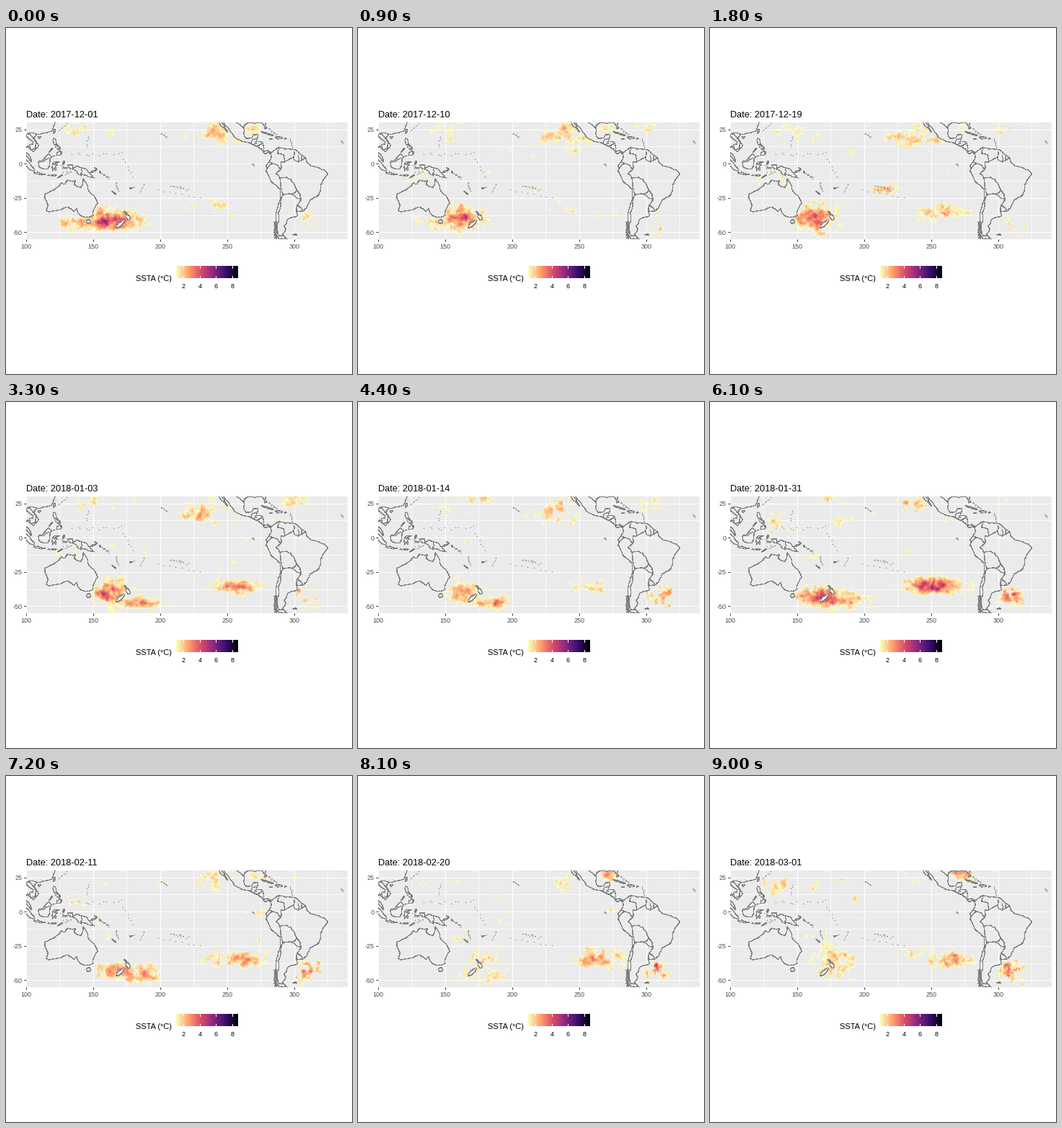
Write a matplotlib script that moves like this. It is 480 by 480 pixels and loops after 9100 ms.

```python
import numpy as np
import matplotlib.pyplot as plt
from matplotlib.animation import FuncAnimation
from matplotlib.collections import LineCollection
from matplotlib.colors import LinearSegmentedColormap
from matplotlib.path import Path

W = H = 480
DPI = 100
PX = 72 / DPI
DAYS = 91
START = np.datetime64("2017-12-01")
GREY = "#7F7F7F"
V_MIN, V_MAX = 1.07, 8.72
HEAT = LinearSegmentedColormap.from_list("heat", plt.cm.magma_r(np.linspace(0, 1, 6)))
rng = np.random.default_rng(12)

plt.rcParams["font.family"] = "Liberation Sans"
plt.rcParams["axes.unicode_minus"] = False

lines, lands, dots = [], [], []


def rough(p):
    """Subdivide a polyline, nudging midpoints sideways for a natural edge."""
    for _ in range(3):
        d = np.diff(p, axis=0)
        side = np.stack([-d[:, 1], d[:, 0]], 1)
        out = np.empty((2 * len(p) - 1, 2))
        out[::2] = p
        out[1::2] = p[:-1] + d / 2 + side * rng.normal(0, 0.07, (len(d), 1))
        p = out
    return p


def border(*v):
    lines.append(rough(np.reshape(np.array(v, float), (-1, 2))))


def coast(*v):
    border(*v, *v[:2])
    lands.append(Path(lines[-1]))


def isle(x, y, length, width, tilt):
    """A ragged ellipse."""
    a = np.arange(8) * np.pi / 4
    z = (length * np.cos(a) + 1j * width * np.sin(a)) / 2 * np.exp(1j * np.radians(tilt))
    coast(*np.stack([x + z.real, y + z.imag], 1).ravel())


def chain(x0, y0, x1, y1, n, spread=0.6):
    """Tiny islands scattered along a line."""
    t = np.linspace(0, 1, n)[:, None]
    line = np.array([x0, y0]) * (1 - t) + np.array([x1, y1]) * t
    dots.append(line + rng.uniform(-spread, spread, (n, 2)))


# Americas
coast(243, 32, 245, 28, 250.2, 23, 248, 27.5, 245.3, 31, 246.9, 31.2, 250.7, 26,
      254.5, 21, 256, 18.8, 263.5, 15.7, 267.5, 14.6, 274.2, 11.5, 277, 8.2,
      279.5, 7.4, 281, 8.9, 282.8, 6.5, 282.6, 3.5, 279.3, -1, 279, -5.5,
      283.7, -13.8, 289.7, -18.4, 289.3, -27, 286.4, -38, 287, -44, 285, -50,
      289, -54.8, 294.8, -54.8, 291.2, -52, 294, -47.5, 292.5, -45.5, 295, -41,
      302.5, -38, 301.6, -34.5, 306, -34.7, 312, -26.5, 318.5, -22.5, 321, -13,
      325.2, -7.5, 322.5, -4.7, 316, -2.3, 310, 0.5, 308.5, 4.5, 298, 10.5,
      288.5, 12, 283.3, 8, 280.5, 9.5, 277.5, 9, 276.8, 15, 271.8, 15.9,
      273, 21.3, 269.6, 21, 268.5, 18.7, 264, 18.5, 262.3, 22, 262.8, 27.5,
      265.5, 29.6, 270.5, 29.2, 276, 29.8, 278.5, 25.3, 279.9, 26, 278.7, 31)
fjord = np.linspace(-42, -54.8, 70)
lines.append(np.stack([286 + rng.uniform(-1, 1.2, 70), fjord], 1))
isle(280, 21.8, 10.5, 1, -18)
isle(288.7, 18.9, 5.5, 1.5, -5)
isle(282.7, 18.1, 2, 0.6, 0)
isle(293.5, 18.2, 1.5, 0.5, 0)
isle(300.5, -51.7, 3, 0.8, 0)

border(256, 30.6, 258, 29.5, 260.5, 27.5, 262.8, 26)
border(267.8, 14.6, 269, 17.8, 271.5, 18.2)
border(270, 14, 272, 14.5, 271, 15.8)
border(272.6, 13, 276.8, 15)
border(274.2, 11.1, 276.3, 10.9)
border(282.5, 8.6, 282.5, 7)
border(288.6, 11.5, 287.5, 7.5, 292.5, 6.2, 293, 1.2, 290.2, 1, 290, -4.2)
border(281.2, 1.4, 284.6, 0, 290, -4.2, 286.3, -7.5, 289.4, -11, 290.5, -18)
border(279.7, -3.8, 284.6, 0)
border(289.4, -11, 294.6, -9.8, 299.8, -14, 302, -19.5, 297.5, -22, 291.8, -22.5, 290.5, -18)
border(291.8, -22.5, 290, -31, 288.5, -40, 287.5, -48, 288, -52, 291.6, -52.2)
border(297.5, -22, 302.3, -25.2, 305.4, -26, 302.4, -30.2, 301.6, -34.3)
border(302, -19.5, 305.4, -26)
border(302.4, -30.2, 306.5, -33.5)
border(300, 8.5, 299.5, 4.5, 293, 1.2)
border(299.5, 4.5, 300.5, 2, 305.5, 2.3, 308.4, 4.2)
border(303, 6, 303.3, 2)
border(306, 5.6, 305.5, 2.3)

# Asia and its islands
coast(122, 32, 121, 28, 114, 22.3, 108.2, 21.5, 105.8, 19, 109.3, 13, 105, 8.6,
      101, 13, 99.3, 10, 103.4, 4, 104, 1.4, 100.3, 6, 97, 10, 95, 34)
border(108, 21.5, 104, 22.6, 100, 21)
border(102, 22.4, 104.5, 19.5, 107.5, 15.5, 107, 11.5, 104.6, 10.4)
border(100, 20, 102, 18, 105, 16, 105.2, 14.3, 102.6, 13.8, 102.8, 11.8)
coast(109, 1, 113, 3.2, 116.8, 7, 119, 5, 117.5, 0.5, 116, -4, 110.2, -2.8)
border(109.6, 1.8, 112, 1.2, 115.5, 3.5, 117.8, 4.1)
coast(120, 0.5, 125, 1.5, 120.5, -0.5, 123.3, -1, 121.8, -2, 122.5, -5,
      120.8, -3, 119.6, -5.5)
isle(100.7, 0, 16, 3.5, -46)
isle(110, -7.3, 9, 1.2, -8)
isle(119.5, -8.5, 7, 0.7, 0)
isle(125.3, -9.3, 4.5, 0.8, 30)
isle(128, 0.7, 2.8, 1, 80)
isle(129.4, -3.1, 3, 0.5, -5)
isle(121.3, 16, 5.2, 2.2, -75)
isle(123.2, 13.5, 2.5, 0.8, -40)
isle(124.7, 7.6, 4, 3, 30)
isle(118.4, 9.8, 4, 0.5, 48)
isle(125, 11.5, 2.2, 1, -60)
isle(121, 23.6, 3.4, 1.2, 70)
isle(109.8, 19.2, 2, 1.4, 20)

# Australasia
coast(113.7, -22.5, 115.7, -32, 115.2, -34.3, 118, -35, 123.8, -33.8, 131.2, -31.5,
      135.6, -34.8, 137.8, -32.8, 140.5, -38, 146.4, -39, 150, -37.5, 153.4, -29,
      150.8, -23.4, 146, -18.5, 145.2, -14.8, 142.6, -10.8, 141, -17.3,
      135.6, -14.9, 136.8, -12.2, 131, -12, 129, -14.9, 126, -14, 122.2, -18)
coast(131, -0.8, 134.5, -1, 135, -3.3, 138, -1.6, 145.8, -5, 147.5, -7,
      150.8, -10.4, 147, -9.8, 143.5, -8.3, 139, -8, 138, -5.4, 133, -3.8)
border(141, -2.6, 141, -9)
isle(146.6, -42.2, 3.2, 3, 0)
isle(176, -39, 5, 2.8, -65)
isle(174.2, -36, 3.4, 0.8, -48)
isle(170.2, -43.9, 8.5, 2.4, 42)
isle(150.3, -5.5, 4.5, 0.9, 25)
isle(152, -3.6, 3, 0.4, -40)
isle(155.2, -6.2, 2, 0.6, -50)
isle(165.5, -21.3, 4, 0.5, -38)
isle(178, -17.8, 1.3, 0.9, 0)

# Small island groups
chain(200.5, 22, 205, 19.3, 8, 0.3)
chain(156.6, -7, 161.8, -10.4, 16)
chain(166.6, -13.5, 169, -19.5, 10)
chain(178, -18, 180, -16.5, 5)
chain(208, -16, 220, -19, 14, 1.3)
chain(134, 7.5, 171, 7, 12, 1.3)
chain(145, 13, 146, 20, 5)
chain(172, 3, 180, -9, 6)
chain(188, -14, 185, -21, 6)
chain(198, -19, 230, -25, 8)
chain(297, 18, 299, 11, 10, 0.3)
chain(281, 26, 287, 21, 12)
chain(268.6, 0, 270, -1, 6, 0.3)
chain(335, 17, 336.5, 15, 6, 0.4)
chain(122, 12, 126, 9, 22, 1)
chain(119, 5, 122, 7, 6)
chain(126, -1, 129, -4, 8, 1)
chain(128, -7, 134, -6, 8, 1)
chain(124, 24, 130, 29, 7, 0.4)

# Anomaly field on a one degree grid
lon, lat = np.meshgrid(np.arange(120.5, 320), np.arange(-54.5, 30))
cells = np.stack([lon.ravel(), lat.ravel()], 1)
is_land = np.any([p.contains_points(cells) for p in lands], axis=0).reshape(lon.shape)

events = []


def warm(x, y, sx, sy, peak, day, span):
    """A patch of warm water that swells and fades around one day."""
    shape = np.exp(-((lon - x) / sx) ** 2 / 2 - ((lat - y) / sy) ** 2 / 2)
    events.append((peak * shape, day, span))


# South Pacific
warm(165, -41.5, 13, 4.5, 4.7, 0, 9)
warm(142, -42.5, 10, 4, 2.2, 0, 9)
warm(163, -40, 10, 6.5, 4, 21, 19)
warm(186, -47.5, 12, 3.5, 3, 36, 9)
warm(168, -43, 12, 5, 4.2, 61, 11)
warm(187, -46, 11, 4.5, 2.8, 68, 10)
warm(178, -36, 10, 10, 1.7, 92, 12)
warm(240, -31, 13, 3.5, 1, 0, 6)
warm(217, -19, 7, 2.5, 1.7, 18, 7)
warm(257, -36, 12, 4, 2.8, 27, 13)
warm(250, -35, 14, 4, 4.3, 61, 8)
warm(264, -35, 13, 5, 2.6, 82, 14)
warm(238, -30, 12, 2.5, 1.4, 90, 8)
warm(134, -12, 12, 5, 1, 22, 16)
# North Pacific
warm(242, 24, 8, 6, 2, 0, 16)
warm(230, 18, 12, 5, 1.9, 28, 22)
warm(239, 24, 9, 6, 1.7, 60, 20)
warm(254, 17, 9, 3, 1.4, 10, 18)
warm(138, 24, 9, 5, 1.1, 0, 8)
warm(150, 24, 14, 5, 1.1, 26, 18)
warm(176, 28, 12, 2.5, 1.5, 50, 12)
warm(136, 10, 8, 7, 1, 60, 14)
warm(138, 20, 13, 5, 1.3, 92, 10)
# Gulf and Atlantic
warm(272, 25, 6, 4, 1.3, 0, 18)
warm(272, 28, 6, 4, 3.2, 90, 13)
warm(302, 26, 9, 5, 1.1, 32, 24)
warm(311, -42, 8, 6, 1.7, 70, 35)
warm(307, -41, 2.5, 4, 3.8, 88, 10)
# Faint short-lived patches
for _ in range(45):
    warm(rng.uniform(122, 290), rng.uniform(-22, 29), rng.uniform(4, 10), rng.uniform(2, 4),
         rng.uniform(0.55, 0.85), rng.uniform(0, 90), rng.uniform(6, 14))

STEP = 4
ky = np.fft.fftfreq(lon.shape[0])[:, None]
kx = np.fft.fftfreq(lon.shape[1])
white = np.fft.fft2(rng.normal(size=(DAYS // STEP + 2,) + lon.shape))


def blurred(sigma):
    n = np.fft.ifft2(white * np.exp(-2 * (np.pi * sigma) ** 2 * (kx**2 + ky**2))).real
    return n / n.std()


noise = 0.65 * blurred(0.6) + 0.55 * blurred(1.8)
gain = np.where((lon > 300) & (lat < -33), 0.85, 0.45)


def anomaly(day):
    base = np.max([f * np.exp(-((day - d) / s) ** 2 / 2) for f, d, s in events], axis=0)
    n, r = divmod(day, STEP)
    a = r / STEP * np.pi / 2
    wobble = np.cos(a) * noise[n] + np.sin(a) * noise[n + 1]
    v = base + gain * base**0.25 * wobble
    return np.ma.masked_where(is_land | (v < 1), v)


fig = plt.figure(figsize=(W / DPI, H / DPI), dpi=DPI, facecolor="white")


def px_axes(x0, y0, x1, y1):
    return fig.add_axes([x0 / W, 1 - y1 / H, (x1 - x0) / W, (y1 - y0) / H])


def label(x, y, s, size, **kw):
    return fig.text(x / W, 1 - y / H, s, fontsize=size * PX, color="black", **kw)


ax = px_axes(28, 131, 474, 293)
ax.set_facecolor("#EBEBEB")
ax.spines[:].set_visible(False)
for x in range(100, 340, 25):
    ax.axvline(x, color="white", lw=(1.07 if x % 50 == 0 else 0.8) * PX, zorder=1)
for y in np.arange(-50, 30, 12.5):
    ax.axhline(y, color="white", lw=(1.07 if y % 25 == 0 else 0.8) * PX, zorder=1)

heat = ax.imshow(anomaly(0), extent=(120, 320, -55, 30), origin="lower", aspect="auto",
                 cmap=HEAT, vmin=V_MIN, vmax=V_MAX, interpolation="nearest", zorder=2)
ax.add_collection(LineCollection(lines, colors=GREY, linewidths=0.2 * PX,
                                 antialiaseds=False, zorder=3))
ax.plot(*np.vstack(dots).T, "s", color=GREY, ms=1.2 * PX, mew=0,
        antialiased=False, zorder=3)
ax.set_xlim(100, 340)
ax.set_ylim(-55, 30)
ax.set_xticks(range(100, 301, 50))
ax.set_yticks(range(-50, 26, 25))
ax.tick_params(length=3 * PX, width=1.07 * PX, color="#333333", labelcolor="#4D4D4D",
               labelsize=9 * PX, pad=2.5 * PX)

bar = px_axes(236, 330, 322, 347)
bar.imshow(np.linspace(V_MIN, V_MAX, 256)[None], cmap=HEAT, aspect="auto",
           extent=(V_MIN, V_MAX, 0, 1))
bar.axis("off")
for v in (2, 4, 6, 8):
    for lo, hi in ((0, 0.2), (0.8, 1)):
        bar.axvline(v, lo, hi, color="white", lw=PX)
    label(236 + 86 * (v - V_MIN) / (V_MAX - V_MIN), 361, str(v), 9, ha="center")
label(180, 351, "SSTA (°C)", 11)
title = label(28, 124, "", 12.8)


def draw(day):
    heat.set_data(anomaly(day))
    title.set_text(f"Date: {START + day}")
    return heat, title


anim = FuncAnimation(fig, draw, frames=DAYS, interval=100, repeat=True, repeat_delay=0)
plt.show()
```
